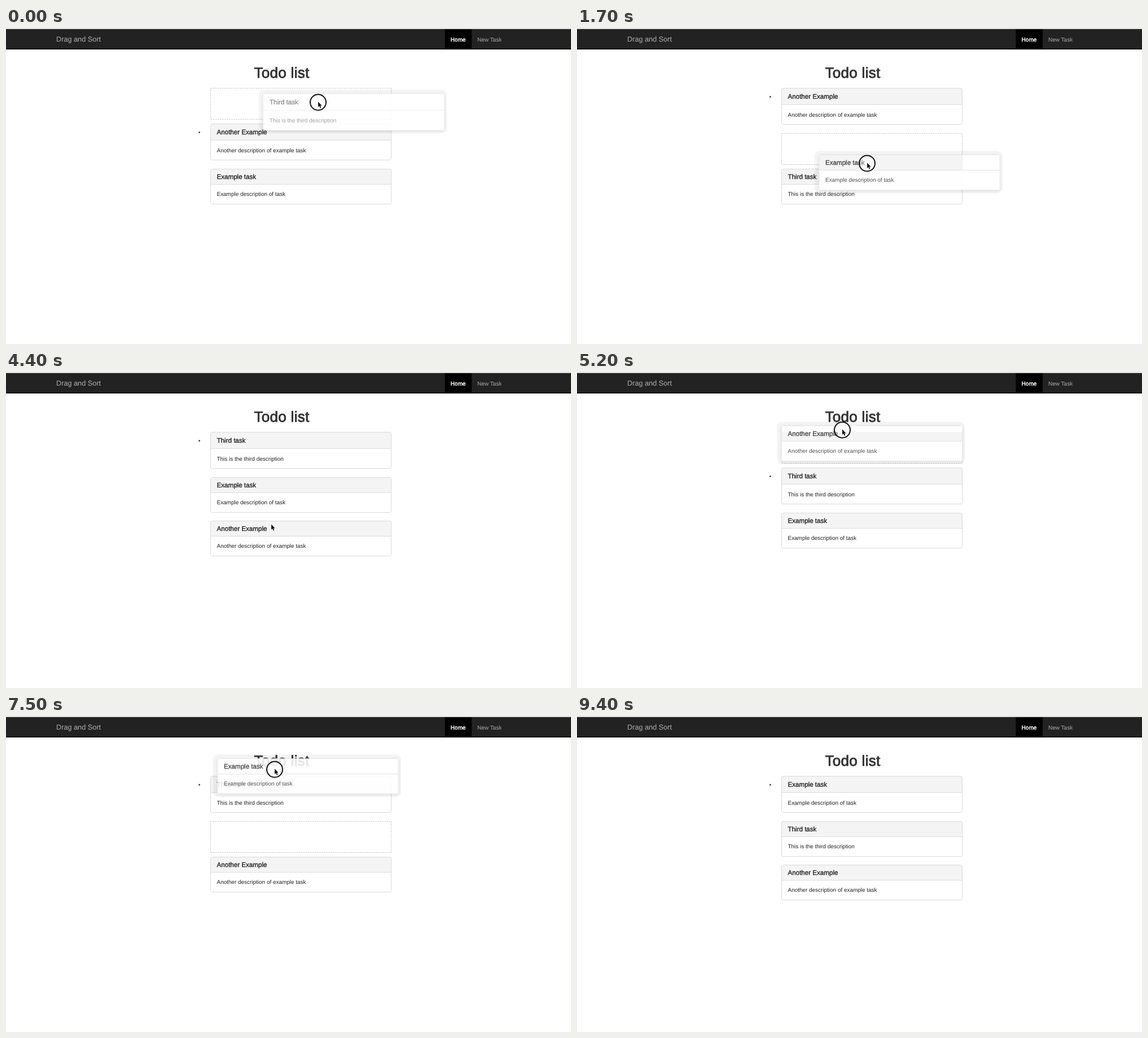
Animation of 1001x559 px, one loop 9600 ms. Source, as an HTML page with a canvas:

```html
<!DOCTYPE html>
<html lang="en">
<head>
<meta charset="utf-8">
<title>Todo list</title>
<style>
html, body { margin: 0; width: 100%; height: 100%; overflow: hidden; background: #fff; }
canvas { display: block; }
</style>
</head>
<body>
<canvas id="stage" width="1001" height="559"></canvas>
<script>
const ctx = document.getElementById('stage').getContext('2d');
const LOOP = 9600, STEP = 100, REST = 100;
const LEFT = 362, TOP = 106, WIDTH = 321;
const FONT = '"Liberation Sans", Arial, sans-serif';

const another = { title: 'Another Example', note: 'Another description of example task' };
const example = { title: 'Example task', note: 'Example description of task' };
const third = { title: 'Third task', note: 'This is the third description' };
const INITIAL = [third, another, example];

// Each drag moves a row to another row and passes through the "via" points.
const DRAGS = [
  { start: -150, end: 800, from: 0, to: 2, via: [{ t: 0, x: 455.5, y: 116, gx: 97, gy: 15 }] },
  { start: 1400, end: 2200, from: 1, to: 2, via: [{ t: 1700, x: 428.5, y: 224, gx: 85, gy: 15 }] },
  { start: 2700, end: 3800, from: 0, to: 2, via: [{ t: 3200, x: 408.5, y: 225, gx: 72, gy: 20 }] },
  { start: 4500, end: 5400, from: 2, to: 0, via: [{ t: 5200, x: 362, y: 95, gx: 108, gy: 7 }] },
  { start: 5500, end: 6100, from: 0, to: 2, via: [{ t: 5800, x: 376, y: 190, gx: 108, gy: 12 }] },
  { start: 6400, end: 8900, from: 1, to: 0, via: [
    { t: 6800, x: 366, y: 94, gx: 101, gy: 15 },
    { t: 8200, x: 383, y: 55, gx: 101, gy: 24 }
  ] }
];

const lerp = (a, b, u) => a + (b - a) * u;
const ease = u => u * u * (3 - 2 * u);
const rowTop = row => TOP + 77 * row + (row ? 3 : 0);

// Card position and grab point over the loop, resting before each press and release.
const track = DRAGS.flatMap(({ start, end, from, to, via }) => {
  const lift = { ...via[0], x: LEFT, y: rowTop(from) };
  const last = via[via.length - 1];
  const land = { ...last, x: lerp(LEFT, last.x, 0.4), y: rowTop(to) };
  return [
    { ...lift, t: start - REST }, { ...lift, t: start }, ...via,
    { ...land, t: end - REST }, { ...land, t: end }
  ];
});
track.push({ t: 9400, x: 400, y: 560, gx: 100, gy: 20 });

function handAt(t) {
  const i = track.findIndex(k => k.t > t);
  if (i < 0) return track[track.length - 1];
  const a = track[i - 1], b = track[i], u = ease((t - a.t) / (b.t - a.t));
  const mix = key => lerp(a[key], b[key], u);
  return { x: mix('x'), y: mix('y'), gx: mix('gx'), gy: mix('gy') };
}

// Replays the drags; null in the order marks the gap.
function stateAt(t) {
  const order = [...INITIAL];
  for (const { start, end, from, to } of DRAGS) {
    if (t < start) break;
    const [task] = order.splice(from, 1);
    if (t < end) {
      const row = Math.round(lerp(from, to, (t - start) / (end - start)));
      order.splice(row, 0, null);
      return { order, task, tall: from === 0 };
    }
    order.splice(to, 0, task);
  }
  return { order };
}

function rect(x, y, w, h, color) {
  ctx.fillStyle = color;
  ctx.fillRect(x, y, w, h);
}

function roundPath(x, y, w, h, r) {
  ctx.beginPath();
  ctx.roundRect(x, y, w, h, r);
}

function outline(color) {
  ctx.strokeStyle = color;
  ctx.lineWidth = 1;
  ctx.stroke();
}

// "heft" thickens the letters to a medium weight
function text(str, x, y, size, color, heft = 0, spacing = 0) {
  ctx.font = size + 'px ' + FONT;
  ctx.letterSpacing = spacing + 'px';
  ctx.fillStyle = color;
  ctx.fillText(str, x, y);
  if (heft) {
    ctx.strokeStyle = color;
    ctx.lineWidth = heft;
    ctx.strokeText(str, x, y);
  }
}

function page() {
  rect(0, 0, 1001, 559, '#fff');
  rect(0, 0, 1001, 1, '#f2f2f2');
  rect(0, 1, 1001, 1, '#c4c4c4');
  rect(0, 2, 1001, 36, '#222');
  rect(777.5, 2, 47.5, 36, '#000');
  rect(0, 36.7, 1001, 1.3, '#090909');
  text('Drag and Sort', 89, 24, 12.7, '#9d9d9d', 0.2);
  text('Home', 787.5, 23.5, 10.1, '#fff', 0.4);
  text('New Task', 835, 23.5, 10, '#9d9d9d', 0.1);
  text('Todo list', 439.5, 88, 26, '#333', 0.9, 0.3);
}

const sizeOf = tall => tall ? { head: 29, h: 65 } : { head: 27, h: 63 };

function cardText({ title, note }, x, y, tall, color) {
  text(title, x + 11.5, y + (tall ? 18.7 : 18), 11.6, color, 0.35);
  text(note, x + 11.5, y + (tall ? 51 : 48), 9.95, color);
}

function card(task, y, tall) {
  const { head, h } = sizeOf(tall);
  roundPath(LEFT + 0.5, y + 0.5, WIDTH - 1, h - 1, 3);
  ctx.save();
  ctx.clip();
  rect(LEFT, y, WIDTH, h, '#fff');
  rect(LEFT, y, WIDTH, head, '#f4f4f4');
  rect(LEFT, y + head, WIDTH, 1, '#ddd');
  ctx.restore();
  outline('#dadada');
  cardText(task, LEFT, y, tall, '#222');
}

function gap(y) {
  ctx.setLineDash([2.5, 1.5]);
  roundPath(LEFT + 0.5, y + 0.5, WIDTH - 1, 55, 0);
  outline('#c8c8c8');
  ctx.setLineDash([]);
}

function list(order) {
  let y = TOP, first = true;
  for (const task of order) {
    if (!task) {
      gap(y);
      y += 63;
      continue;
    }
    card(task, y, first);
    if (first) {
      ctx.fillStyle = '#333';
      ctx.beginPath();
      ctx.arc(342.5, y + 15.7, 1.4, 0, 7);
      ctx.fill();
    }
    y += first ? 80 : 77;
    first = false;
  }
}

function dragged(task, x, y, tall, ink) {
  const { head, h } = sizeOf(tall);

  // shadow only outside the translucent card
  ctx.save();
  ctx.beginPath();
  ctx.rect(0, 0, 1001, 559);
  ctx.roundRect(x, y, WIDTH, h, 3);
  ctx.clip('evenodd');
  roundPath(x - 8, y - 7, WIDTH + 12, h + 12, 9);
  ctx.fillStyle = 'rgba(0,0,0,.04)';
  ctx.fill();
  ctx.shadowColor = 'rgba(0,0,0,.1)';
  ctx.shadowBlur = 6;
  ctx.shadowOffsetY = 1;
  roundPath(x, y, WIDTH, h, 3);
  ctx.fillStyle = '#fff';
  ctx.fill();
  ctx.restore();

  // the header tint shows only over the list area
  ctx.save();
  roundPath(x, y, WIDTH, h, 3);
  ctx.clip();
  rect(x, y, WIDTH, h, 'rgba(255,255,255,.88)');
  const tintTop = Math.max(y, TOP);
  rect(x, tintTop, LEFT + WIDTH - x, Math.max(0, y + head - tintTop),
    `rgba(243,243,243,${2 * ink - 1.1})`);
  rect(x, y + head, WIDTH, 1, `rgba(226,226,226,${ink})`);
  ctx.restore();

  roundPath(x + 0.5, y + 0.5, WIDTH - 1, h - 1, 3);
  outline(`rgba(215,215,215,${ink * 0.5})`);
  cardText(task, x, y, tall, `rgba(40,40,40,${ink * 0.8})`);
}

function pointer(x, y, pressed) {
  if (pressed) {
    ctx.beginPath();
    ctx.arc(x, y + 0.5, 14, 0, 7);
    ctx.fillStyle = 'rgba(255,255,255,.35)';
    ctx.fill();
    ctx.strokeStyle = '#111';
    ctx.lineWidth = 2;
    ctx.stroke();
  }
  const arrow = new Path2D(
    `M${x} ${y - 0.5}v9.5l2.2-1.9 1.6 3.6 1.6-.7-1.5-3.5h2.8z`);
  ctx.strokeStyle = '#fff';
  ctx.lineWidth = 1.4;
  ctx.stroke(arrow);
  ctx.fillStyle = '#111';
  ctx.fill(arrow);
}

function draw(t) {
  const { order, task, tall } = stateAt(t);
  const { x, y, gx, gy } = handAt(t);
  page();
  list(order);
  if (task) dragged(task, x, Math.round(y), tall, Math.min(1, 0.55 + t / 600));
  pointer(Math.round(x + gx), Math.round(y + gy), !!task);
}

ctx.textRendering = 'geometricPrecision';
ctx.lineJoin = 'round';
const start = performance.now();

function tick() {
  const t = (performance.now() - start) % LOOP;
  draw(Math.floor(t / STEP) * STEP);
  requestAnimationFrame(tick);
}
tick();
</script>
</body>
</html>
```
